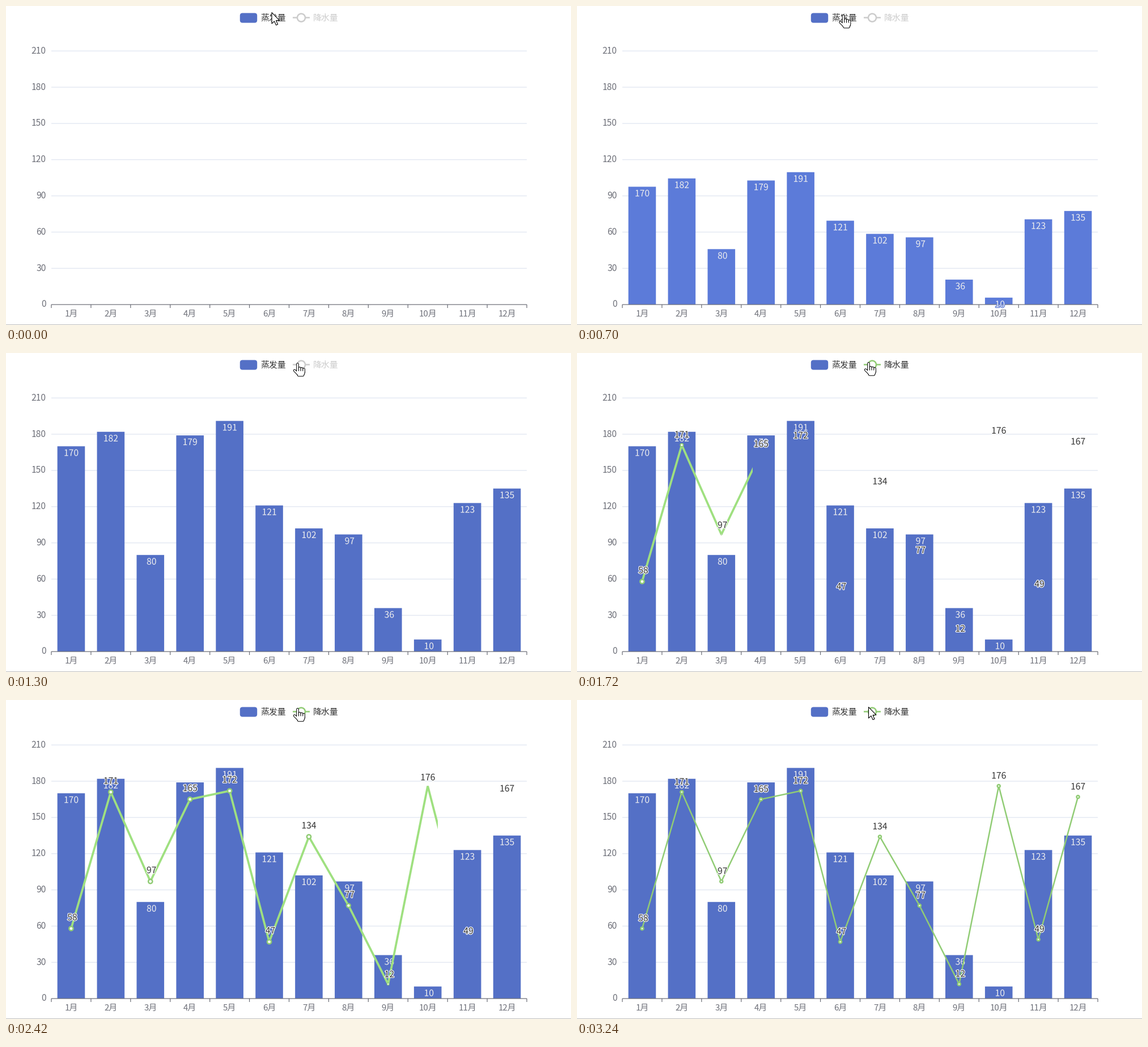
A matplotlib script that plays this animation: 997x562 px, repeating every 3340 ms.

```python
import numpy as np
import matplotlib.pyplot as plt
from matplotlib.animation import FuncAnimation
from matplotlib.colors import to_rgb
from matplotlib.patches import Circle, FancyBboxPatch, Polygon, Rectangle
from matplotlib.patheffects import withStroke

W, H, DPI = 997, 562, 64
PX = 72 / DPI  # points per pixel
LOOP, STEP = 3340, 20

LEFT, RIGHT, BASE, UNIT = 80, 919, 526, 2.1275
BAND = (RIGHT - LEFT) / 12
BAR_W = 48.6
EVAPORATION = [170, 182, 80, 179, 191, 121, 102, 97, 36, 10, 123, 135]
RAINFALL = [58, 171, 97, 165, 172, 47, 134, 77, 12, 176, 49, 167]
BLUE, BLUE_HOT = "#5470c6", "#5c7bd9"
GREEN, GREEN_HOT = "#91cc75", "#9fe080"
AXIS, GRID, DARK, OFF = "#6e7079", "#e0e6f1", "#333333", "#cccccc"

BAR_START, BAR_TIME = 32, 1270
LINE_START, LINE_TIME = 1364, 1300
HOVER_TIME, POP_TIME = 390, 260
HAND_ON, HAND_OFF = 100, 2920

plt.rcParams["font.family"] = "Noto Sans CJK JP"
fig = plt.figure(figsize=(W / DPI, H / DPI), dpi=DPI, facecolor="white")
ax = fig.add_axes([0, 0, 1, 1])
ax.set_xlim(0, W)
ax.set_ylim(H, 0)
ax.axis("off")


def ypos(v):
    return BASE - v * UNIT


def mix(a, b, k):
    return tuple(np.array(to_rgb(a)) * (1 - k) + np.array(to_rgb(b)) * k)


def ramp(t, start, length):
    return min(max((t - start) / length, 0), 1)


def cubic_in_out(p):
    return 4 * p ** 3 if p < 0.5 else 1 - (2 - 2 * p) ** 3 / 2


def cubic_out(p):
    return 1 - (1 - p) ** 3


def hover(t, start, end):
    """Strength of the highlight between mouse-over and mouse-out."""
    return (cubic_out(ramp(t, start, HOVER_TIME))
            - cubic_out(ramp(t, end, HOVER_TIME)))


def stroke(x, y, color, width, z, cap="butt", join="bevel"):
    return ax.plot(x, y, color=color, lw=width * PX, zorder=z, snap=False,
                   solid_capstyle=cap, solid_joinstyle=join)[0]


def label(x, y, s, size, color, z, ha="center", border=None):
    fx = [withStroke(linewidth=2.5 * PX, foreground=border)] if border else None
    return ax.text(x, y, s, fontsize=size * PX, color=color, ha=ha,
                   va="baseline", zorder=z, path_effects=fx)


# Axes
for v in range(0, 211, 30):
    y = ypos(v)
    stroke([LEFT, RIGHT], [y, y], GRID if v else AXIS, 1.25, 1 if v else 3)
    label(70.8, y + 4.5, str(v), 15.7, AXIS, 1, ha="right")
for x in LEFT + BAND * np.arange(13):
    stroke([x, x], [BASE, BASE + 6], AXIS, 1.25, 3)
centers = LEFT + BAND * (np.arange(12) + 0.5)
for month, x in enumerate(centers, 1):
    label(x, 547, f"{month}月", 15, AXIS, 3)
stroke([0, W], [561.5, 561.5], "#bdbdbd", 1, 1)

# Legend
ax.add_patch(FancyBboxPatch((417.3, 16.9), 21.4, 8.2, fc=BLUE, ec="none",
                            boxstyle="round,pad=4.5,rounding_size=4.5",
                            zorder=8, snap=False))
label(449, 25.5, "蒸发量", 14.9, DARK, 8, ha="left")
key_line = stroke([506, 536], [20.5, 20.5], OFF, 2.5, 8)
key_dot = ax.add_patch(Circle((521, 20.6), 7, fc="white", ec=OFF,
                              lw=2.5 * PX, zorder=8))
key_text = label(542, 25.5, "降水量", 14.9, OFF, 8, ha="left")


def value_label(x, v, color, z, border):
    # Two-digit values sit slightly to the right
    return label(x + 2 * (v < 100), BASE, str(v), 15.7, color, z, border=border)


# Series
bars = [ax.add_patch(Rectangle((x - BAR_W / 2, BASE), BAR_W, 0, ec="none",
                               zorder=2, snap=False)) for x in centers]
bar_labels = [value_label(x, v, "#eeeeee", 4, BLUE)
              for x, v in zip(centers, EVAPORATION)]
rain = stroke(centers, [ypos(v) for v in RAINFALL], GREEN, 2.5, 5)
dots = [ax.add_patch(Circle((x, ypos(v)), 1, fc="white", zorder=6))
        for x, v in zip(centers, RAINFALL)]
dot_labels = [value_label(x, v, DARK, 7, "white")
              for x, v in zip(centers, RAINFALL)]


def hand_shape():
    """Pointing hand as round strokes: fingers, thumb and a tapered palm."""
    parts = [((0, 2.3), (0, 16)), ((-5.4, 13.6), (1, 20))]
    parts += [((3.7 * k, 9 + k * k / 4), (3.7 * k, 16)) for k in (1, 2, 3)]
    for y in range(16, 24, 2):
        taper = max(0, y - 18) * 0.4
        parts.append(((taper, y), (11 - taper, y)))
    gap = (np.nan, np.nan)
    return np.array([p for a, b in parts for p in (a, b, gap)])


# Pointers, drawn around their hot spot
ARROW = np.array([(0, 0), (0, 19.5), (4.5, 15.4), (7.6, 22.2), (10.6, 20.9),
                  (7.6, 14.1), (13.5, 13.8)])
HAND = hand_shape()
arrow = ax.add_patch(Polygon(ARROW, fc="white", ec="black", lw=1.1 * PX,
                             joinstyle="round", zorder=10))
hand = [stroke([], [], color, width, 10, cap="round")
        for color, width in (("black", 4.6), ("white", 2.6))]
# time, x, y
PATH = np.array([(0, 469, 11.5), (400, 470, 19), (700, 470, 15),
                 (1200, 514.5, 17.5), (HAND_OFF, 514.5, 12.5)])


def draw_pointer(t):
    spot = [np.interp(t, PATH[:, 0], PATH[:, k]) for k in (1, 2)]
    is_hand = HAND_ON <= t < HAND_OFF
    arrow.set_xy(ARROW + spot)
    arrow.set_visible(not is_hand)
    for part in hand:
        part.set_data(*(HAND + spot).T)
        part.set_visible(is_hand)


def draw_bars(t):
    grow = cubic_in_out(ramp(t, BAR_START, BAR_TIME))
    color = mix(BLUE, BLUE_HOT, hover(t, BAR_START, 800))
    border = [withStroke(linewidth=2.5 * PX, foreground=color)]
    for bar, text, v in zip(bars, bar_labels, EVAPORATION):
        top = ypos(v * grow)
        bar.set(y=top, height=BASE - top, facecolor=color)
        text.set(y=top + 17, visible=grow > 0, path_effects=border)


def draw_line(t):
    on = t >= LINE_START
    key_line.set_color(GREEN if on else OFF)
    key_dot.set_edgecolor(GREEN if on else OFF)
    key_text.set_color(DARK if on else OFF)

    hot = hover(t, LINE_START, 2850)
    reveal = LEFT + (RIGHT - LEFT) * ramp(t, LINE_START, LINE_TIME)
    rain.set(visible=on, color=mix(GREEN, GREEN_HOT, hot),
             linewidth=(2.5 + 1.25 * hot) * PX)
    rain.set_clip_path(Rectangle((0, 0), reveal, H, transform=ax.transData))

    for x, dot, text, v in zip(centers, dots, dot_labels, RAINFALL):
        delay = (x - LEFT) / (RIGHT - LEFT) * LINE_TIME
        pop = ramp(t, LINE_START + delay, POP_TIME)
        dot.set(visible=pop > 0, radius=(2.5 + 1.1 * hot) * pop,
                linewidth=2.5 * pop * PX, edgecolor=GREEN)
        text.set(visible=on, y=ypos(v) - 9.5 - pop * (3.5 + 1.5 * hot))


def held(now):
    """Time of the last visible step: every 100 ms, with two late ones."""
    late = 20 * ((now >= 1400) + (now >= 3040))
    return (now - late) // 100 * 100 + late


def update(i):
    t = held(i * STEP)
    draw_bars(t)
    draw_line(t)
    draw_pointer(t)
    return []


anim = FuncAnimation(fig, update, frames=LOOP // STEP, interval=STEP,
                     repeat=True, repeat_delay=0, blit=False)
plt.show()
```
